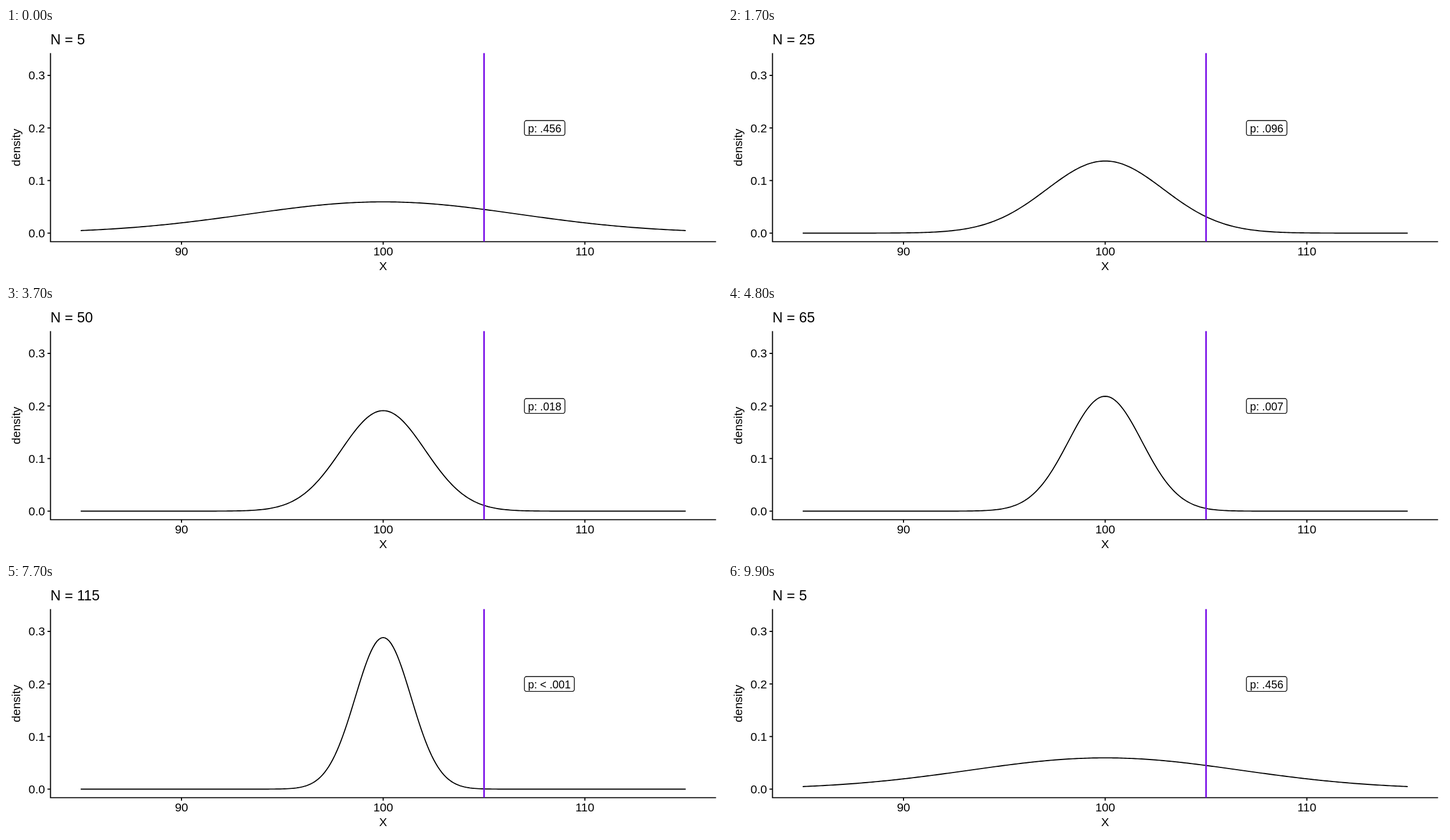
These frames come from a looping animation (1265 px wide and 443 px high, 10000 ms). An HTML page:

```html
<!DOCTYPE html>
<html lang="en">
<head>
<meta charset="utf-8">
<title>Sampling distribution</title>
<style>
  html, body { margin: 0; width: 100%; height: 100%; overflow: hidden; background: #fff; }
  svg { display: block; width: 100vw; height: 100vh; }
  text { font: 21px "Liberation Sans", Arial, sans-serif; fill: #000; }
  #title { font-size: 25.2px; }
  #pText { font-size: 19.3px; }
  .line { fill: none; stroke: #000; stroke-width: 1.9; }
</style>
</head>
<body>
<svg viewBox="0 0 1265 443">
  <path class="line" d="M78.6 44.5V378.6H1254.5"/>
  <g id="ticks"></g>
  <text id="title" x="78.5" y="29"></text>
  <text x="666.3" y="428.9" text-anchor="middle">X</text>
  <text transform="translate(25.2 211.7) rotate(-90)" text-anchor="middle">density</text>
  <path id="curve" class="line"/>
  <path d="M844.6 44.5V378.6" stroke="#7a10e8" stroke-width="2.8"/>
  <rect id="pBox" x="915.9" y="164" height="26.4" rx="3.8" fill="#fff" stroke="#000" stroke-width="1.35"/>
  <text id="pText" x="922.2" y="184.6"></text>
</svg>
<script>
const FRAME_MS = 100, STATES = 30, MEAN = 100, SD = 15, CUTOFF = 105;
const $ = id => document.getElementById(id);
const px = x => 666.4 + (x - MEAN) * 35.63;
const py = d => 363.5 - d * 931.7;
const sampleSize = i => 5 * (i % STATES + 1);

function density(x, n) {
  const se = SD / Math.sqrt(n);
  return Math.exp(-(((x - MEAN) / se) ** 2) / 2) / (se * Math.sqrt(2 * Math.PI));
}

// Two-sided p value, by the midpoint rule
function pLabel(n) {
  const steps = 500, dx = (CUTOFF - MEAN) / steps;
  let area = 0;
  for (let i = 0; i < steps; i++) area += density(MEAN + (i + 0.5) * dx, n) * dx;
  const p = 1 - 2 * area;
  return "p: " + (p < 0.001 ? "< .001" : p.toFixed(3).slice(1));
}

// Each state is held for at most one extra frame, then blends into the next
function buildTimeline() {
  const frames = [{ from: 5, to: 5, mix: 0 }];
  const heldBefore = i => Math.floor(i * 28 / STATES);
  for (let i = 0; i < STATES; i++) {
    const from = sampleSize(i), to = sampleSize(i + 1);
    if (heldBefore(i + 1) > heldBefore(i)) frames.push({ from, to, mix: 0 });
    const steps = i < 11 ? 3 : 2;
    for (let k = 1; k <= steps; k++) frames.push({ from, to, mix: k / steps });
  }
  return frames;
}

function curvePath({ from, to, mix }) {
  const points = [];
  for (let i = 0; i <= 300; i++) {
    const x = 85 + i / 10;
    const d = density(x, from) * (1 - mix) + density(x, to) * mix;
    points.push(px(x).toFixed(2) + " " + py(d).toFixed(2));
  }
  return "M" + points.join("L");
}

function drawTicks() {
  let marks = "";
  for (const d of [0, 0.1, 0.2, 0.3]) {
    const y = py(d);
    marks += `<path class="line" d="M73.3 ${y}h5.3"/>
      <text x="69" y="${y + 7.5}" text-anchor="end">${d.toFixed(1)}</text>`;
  }
  for (const x of [90, 100, 110]) {
    marks += `<path class="line" d="M${px(x)} 378.6v5.3"/>
      <text x="${px(x)}" y="403.4" text-anchor="middle">${x}</text>`;
  }
  $("ticks").innerHTML = marks;
}

const timeline = buildTimeline();
let shown = -1;

function render(now) {
  const index = Math.floor(now / FRAME_MS) % timeline.length;
  if (index !== shown) {
    shown = index;
    const frame = timeline[index];
    const n = frame.mix > 0.5 ? frame.to : frame.from;
    const label = pLabel(n);
    $("title").textContent = "N = " + n;
    $("curve").setAttribute("d", curvePath(frame));
    $("pText").textContent = label;
    $("pBox").setAttribute("width", label.includes("<") ? 88.2 : 71.6);
  }
}

function loop() {
  render(performance.now());
  requestAnimationFrame(loop);
}

drawTicks();
loop();
</script>
</body>
</html>
```
